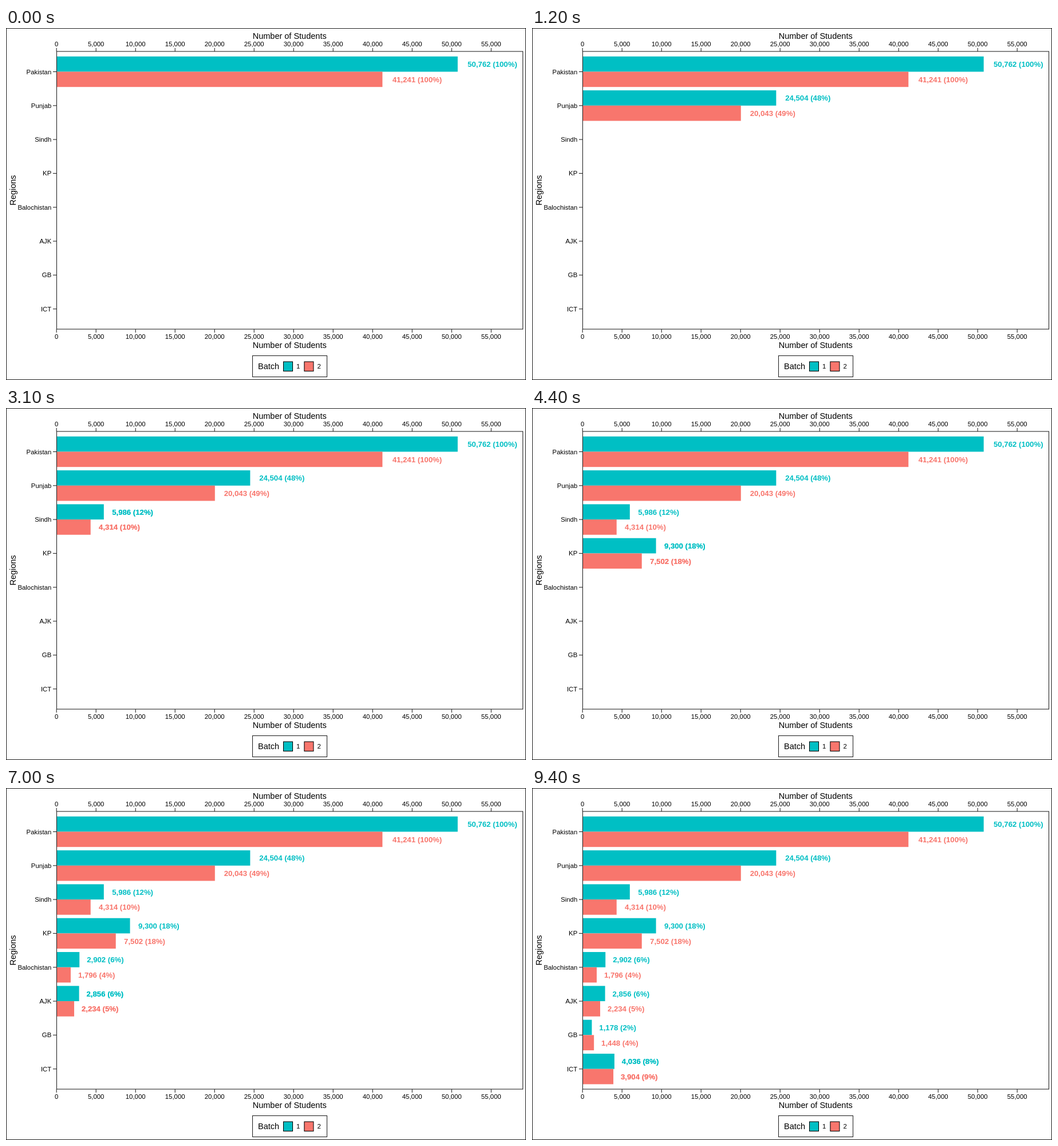
Animation of 908 by 616 pixels, one loop 10000 ms. Source, as an HTML page:

```html
<!DOCTYPE html>
<html lang="en">
<head>
<meta charset="utf-8">
<title>Students by region and batch</title>
<style>
  html, body { margin: 0; width: 100%; height: 100%; overflow: hidden; background: #fff; }
  svg { display: block; width: 908px; height: 616px; }
  text { font-family: "Liberation Sans", Arial, sans-serif; font-size: 11.4px; fill: #000; }
  .title { font-size: 14.5px; }
  .value { font-size: 13.2px; font-weight: bold; }
  .line { fill: none; stroke: #222; stroke-width: 1.07; }
</style>
</head>
<body>
<svg id="stage" viewBox="0 0 908 616"></svg>
<script>
const LOOP = 10000;
const TEAL = "#00bfc4", RED = "#f8766d";
const LEFT = 88.2, RIGHT = 902.4, TOP = 41, BOTTOM = 527;
const BAR = 26.7, ROW_TOP = 76.5, ROW_STEP = 59.31;
const VALUE_SIZE = 13.2;

// name, batch 1 count and share, batch 2 count and share, time shown, time labels are overdrawn
const regions = [
  ["Pakistan", 50762, 100, 41241, 100, 0, 500],
  ["Punjab", 24504, 48, 20043, 49, 1200, 1800],
  ["Sindh", 5986, 12, 4314, 10, 2500, 3100],
  ["KP", 9300, 18, 7502, 18, 3800, 4400],
  ["Balochistan", 2902, 6, 1796, 4, 5100, 5700],
  ["AJK", 2856, 6, 2234, 5, 6400, 7000],
  ["GB", 1178, 2, 1448, 4, 7600, 8200],
  ["ICT", 4036, 8, 3904, 9, 8800, 9400]
];

const stage = document.getElementById("stage");

function add(parent, tag, attrs, content) {
  const node = document.createElementNS("http://www.w3.org/2000/svg", tag);
  for (const key in attrs) node.setAttribute(key, attrs[key]);
  if (content !== undefined) node.textContent = content;
  return parent.appendChild(node);
}

const label = (x, y, content, attrs) =>
  add(stage, "text", { x, y, "text-anchor": "middle", ...attrs }, content);
const line = d => add(stage, "path", { d, class: "line" });
const box = (x, y, width, height, attrs) =>
  add(stage, "rect", { x, y, width, height, ...attrs });

const comma = n => n.toLocaleString("en-US");
const scaleX = n => LEFT + n * 759 / 55000;

function addBar(group, overlay, y, count, share, fill) {
  const end = scaleX(count);
  add(group, "rect", { x: LEFT, y, width: end - LEFT, height: BAR, fill });

  // The gap is a fifth of the label's width.
  const digits = String(count).length + String(share).length;
  const gap = 0.2 * VALUE_SIZE * (0.556 * digits + 2.111);
  const attrs = { x: end + gap, y: y + BAR / 2 + 4.9, class: "value", style: "fill:" + fill };
  const content = `${comma(count)} (${share}%)`;
  add(group, "text", attrs, content);
  add(overlay, "text", attrs, content);
}

box(0, 0, 908, 616, { fill: "#fff" });
box(0.5, 0.5, 907, 615, { class: "line" });

const rows = regions.map(([name, n1, p1, n2, p2, start, bold], i) => {
  const y = ROW_TOP + i * ROW_STEP;
  const group = add(stage, "g", {});
  const overlay = add(group, "g", {});
  addBar(group, overlay, y - BAR, n1, p1, TEAL);
  addBar(group, overlay, y, n2, p2, RED);
  const next = regions[i + 1];
  return { group, overlay, start, bold, end: next ? next[5] : LOOP };
});

box(88.5, 41, 814, 486, { class: "line" });

regions.forEach(([name], i) => {
  const y = ROW_TOP + i * ROW_STEP;
  line(`M82 ${y}H88.5`);
  label(79.3, y + 4, name, { "text-anchor": "end" });
});

for (let n = 0; n <= 55000; n += 5000) {
  const x = scaleX(n);
  line(`M${x} 35V${TOP}M${x} ${BOTTOM}v6`);
  label(x, 32.3, comma(n));
  label(x, 544, comma(n));
}

label(495.2, 19, "Number of Students", { class: "title" });
label(495.2, 560, "Number of Students", { class: "title" });
label(0, 0, "Regions", { class: "title", transform: "translate(17 284) rotate(-90)" });

box(430.5, 573.5, 130, 37, { class: "line" });
label(440, 597, "Batch", { class: "title", "text-anchor": "start" });
[TEAL, RED].forEach((fill, i) => {
  const x = 484.5 + i * 36.4;
  box(x, 584, 16, 16.5, { fill, stroke: "#000", "stroke-width": 1.07 });
  label(x + 25.7, 596.3, i + 1);
});

function draw(t) {
  for (const row of rows) {
    row.group.style.display = t >= row.start ? "" : "none";
    row.overlay.style.display = t >= row.bold && t < row.end ? "" : "none";
  }
}

const origin = performance.now();
function tick() {
  draw((performance.now() - origin) % LOOP);
  requestAnimationFrame(tick);
}
tick();
</script>
</body>
</html>
```
